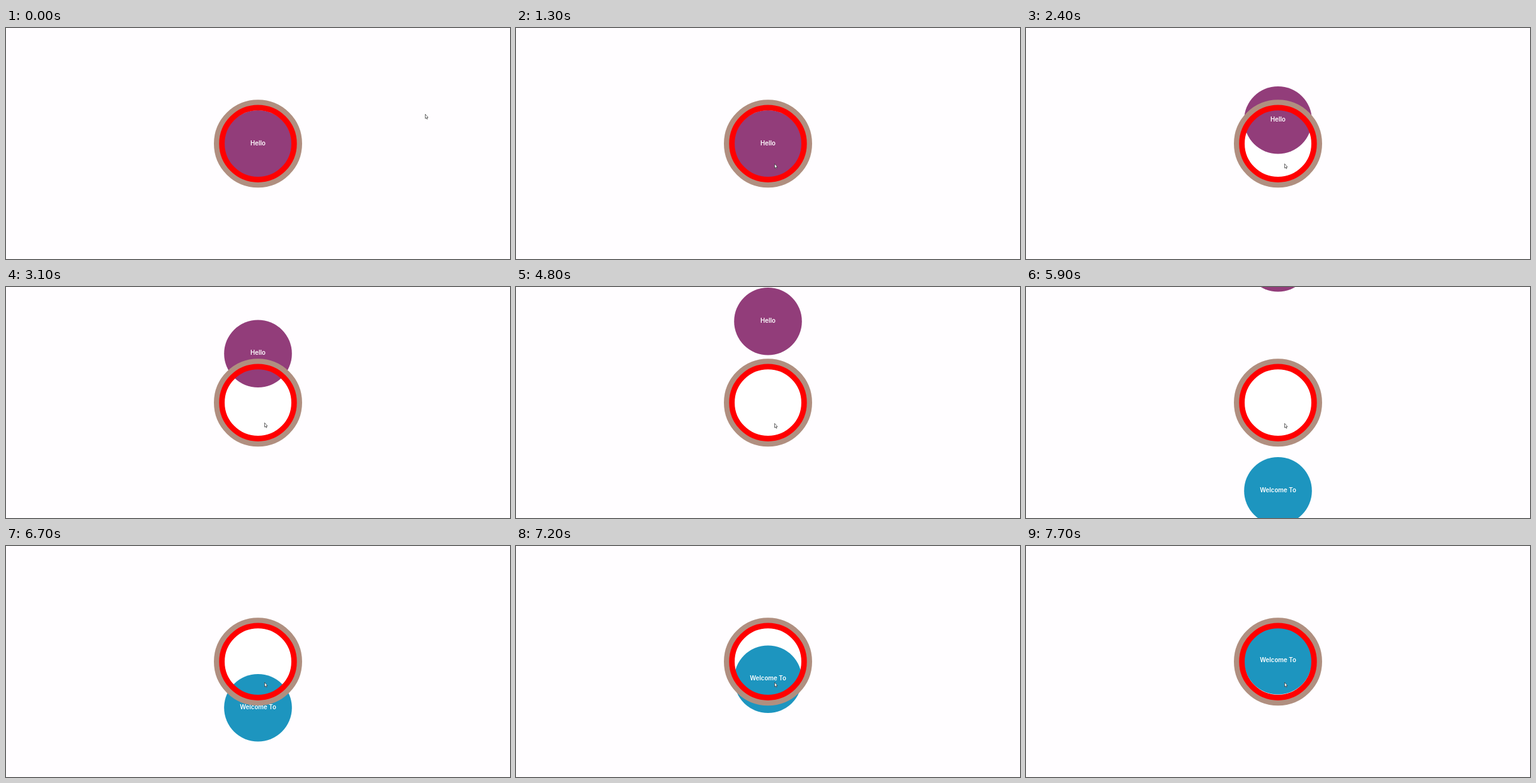
An HTML page that plays this animation: 800x368 px, repeating every 8000 ms.

```html
<!DOCTYPE html>
<html lang="en">
<head>
<meta charset="utf-8">
<title>Scrolling discs</title>
<style>
  html, body { margin: 0; width: 100%; height: 100%; overflow: hidden; background: #fffdff; }
  svg { display: block; }
  text { font: 600 9.7px Inter, "Open Sans", sans-serif; fill: #fff; text-anchor: middle; }
</style>
</head>
<body>
<svg width="800" height="368" viewBox="0 0 800 368">
  <circle cx="400" cy="184.2" r="56" fill="#fff"/>
  <g id="page">
    <circle cx="400" cy="184.7" r="53.8" fill="#923d7a"/>
    <text x="400" y="186.8">Hello</text>
    <circle cx="400" cy="555.7" r="53.8" fill="#1d95bf"/>
    <text x="400" y="557.8">Welcome To</text>
  </g>
  <g fill="none">
    <circle cx="400" cy="184.2" r="65.5" stroke="#b08f80" stroke-width="9"/>
    <circle cx="400" cy="184.2" r="57.3" stroke="#f00" stroke-width="8.8"/>
  </g>
  <path id="cursor" d="M.5 .3V7.2L2 5.9L3 8.2L4.1 7.7L3.1 5.5H5Z" fill="#fff" stroke="#333" stroke-width=".7"/>
</svg>
<script>
const LOOP = 8000, STEP = 100;

// Keys are [time, value, ...]
const scrollKeys = [
  [1900, 0], [2400, 38], [2600, 53], [2800, 53], [3100, 78.5], [4400, 78.5],
  [4800, 130], [5300, 182], [5700, 218], [5800, 218], [5900, 231], [6300, 284.5],
  [6600, 284.5], [6700, 298], [7000, 337.5], [7100, 337.5], [7700, 373]
];
const cursorKeys = [
  [0, 665, 137], [500, 558, 199], [600, 558, 199], [1100, 418, 219],
  [1300, 410, 216], [4400, 410, 216], [4500, 410, 217]
];

function sample(keys, t) {
  const next = keys.findIndex(k => k[0] > t);
  if (next < 0) return keys[keys.length - 1].slice(1);
  if (next === 0) return keys[0].slice(1);
  const a = keys[next - 1], b = keys[next];
  const p = (t - a[0]) / (b[0] - a[0]);
  return a.slice(1).map((v, i) => v + (b[i + 1] - v) * p);
}

const page = document.getElementById("page");
const cursor = document.getElementById("cursor");
const start = performance.now();

function draw() {
  const elapsed = (performance.now() - start) % LOOP;
  const t = Math.floor(elapsed / STEP) * STEP;
  page.setAttribute("transform", `translate(0 ${-sample(scrollKeys, t)[0]})`);
  cursor.setAttribute("transform", `translate(${sample(cursorKeys, t).join(" ")})`);
  requestAnimationFrame(draw);
}
draw();
</script>
</body>
</html>
```
